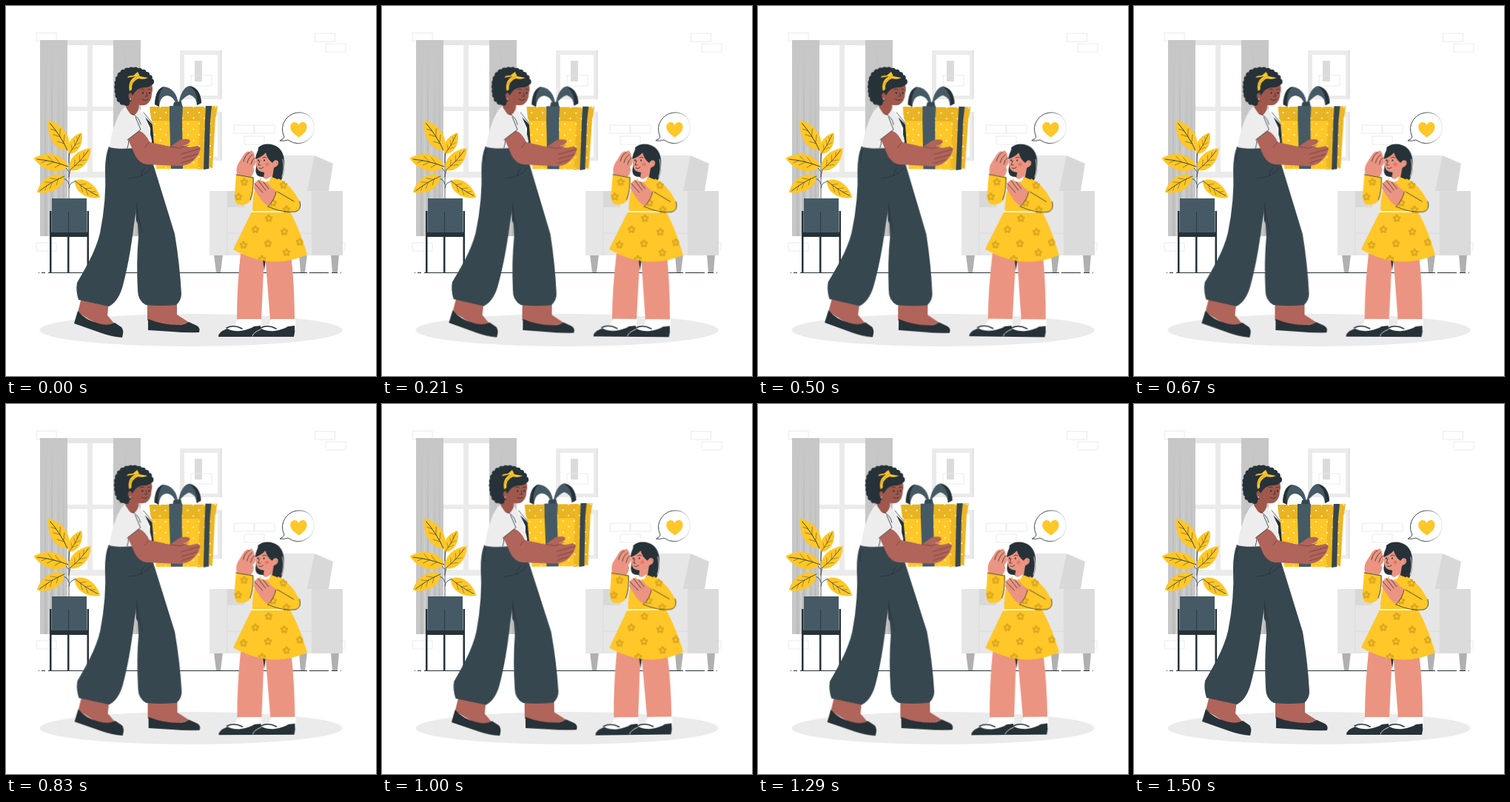
An HTML page that plays this animation: 500x500 px, repeating every 1.54 s.

```html
<!DOCTYPE html>
<html lang="en">
<head>
<meta charset="utf-8">
<title>A present</title>
<style>
html, body { margin: 0; width: 100%; height: 100%; overflow: hidden; background: #fff; }
svg { display: block; width: 100vw; height: 100vh; }
.sway { animation: sway 1540ms linear infinite; }
#woman { transform-origin: 189px 265px; }
#girl { transform-origin: 347px 317px; }
#bubble { transform-origin: 394px 165px; }
/* 1500 ms swing, then a short rest */
@keyframes sway {
  0%, 97.4%, 100% { transform: rotate(0deg); }
  24.35% { transform: rotate(1deg); }
  73.05% { transform: rotate(-1deg); }
}
.line { fill: none; stroke: #263238; stroke-width: .8; stroke-linecap: round; stroke-linejoin: round; }
.ink { fill: #263238; }
.slate { fill: #37474f; }
.steel { fill: #455a64; }
.gold { fill: #ffc727; }
.ochre { fill: #dba81f; }
.face { fill: #a0584c; }
.brown { fill: #b0645a; }
.pink { fill: #eb9481; }
.white { fill: #fff; }
.shirt { fill: #ededed; }
.brick { fill: none; stroke: #e8e8e8; stroke-width: .9; }
</style>
</head>
<body>
<svg viewBox="0 0 500 500">
<defs>
  <g id="leaf">
    <path class="gold" d="M0 0C-14-8-16-30-2-48C13-34 15-10 0 0Z"/>
    <path class="line" stroke-width=".8" d="M0 0Q2-22-2-43"/>
    <path class="line" style="stroke-width:.45" d="M1-10L-6-17M1-12L7-20M1-20L-6-28M1-22L6-30M0-30L-5-36"/>
  </g>
  <g id="flower" class="ochre">
    <circle cy="-3.3" r="2.1"/><circle cx="3.2" cy="-1" r="2.1"/><circle cx="2" cy="2.8" r="2.1"/>
    <circle cx="-2" cy="2.8" r="2.1"/><circle cx="-3.2" cy="-1" r="2.1"/>
    <circle r="1.1" fill="#ffc727"/>
  </g>
  <pattern id="dots" width="15" height="15" patternUnits="userSpaceOnUse" x="198" y="141">
    <circle cx="3" cy="3" r="1" fill="#fff"/><circle cx="10.5" cy="10.5" r="1" fill="#fff"/>
  </pattern>
  <path id="brick" class="brick" d="M0 0H27V11H0Z"/>
  <g id="curtain">
    <path fill="#c7c7c7" d="M0 0H37V265H0Z"/>
    <path fill="#bcbcbc" d="M7 20L9 265H6ZM16 5L18 265H14ZM25 35L27 265H24ZM32 10L33 265H30Z"/>
    <path fill="#d0d0d0" d="M11 15L13 265H11ZM21 30L23 265H20Z"/>
  </g>
  <linearGradient id="fade">
    <stop offset=".45" stop-color="#263238"/><stop offset="1" stop-color="#263238" stop-opacity=".12"/>
  </linearGradient>
  <clipPath id="skirtClip"><path d="M332 278H384Q398 304 407 336Q358 358 307 329Z"/></clipPath>
</defs>

<g id="room">
  <use href="#brick" x="41" y="36.500"/><use href="#brick" x="417.500" y="37"/><use href="#brick" x="432" y="51"/>
  <use href="#brick" x="308" y="161"/><use href="#brick" x="336" y="161"/><use href="#brick" x="322" y="176"/>
  <use href="#brick" x="41" y="320"/><path class="brick" d="M440 320H458V330H440"/>
  <path fill="#ebebeb" d="M82 46H146V232H82Z"/>
  <path class="white" d="M83 53H110V136H83ZM117 53H145V136H117ZM83 142H110V224H83ZM117 142H145V224H117Z"/>
  <path fill="#e6e6e6" d="M82 46H146V53H82Z"/>
  <use href="#curtain" x="46" y="46"/><use href="#curtain" x="145" y="46"/>
  <path fill="#ebebeb" d="M235 60H291V126H235ZM241 66V121H286V66Z" fill-rule="evenodd"/>
  <path fill="#dbdbdb" d="M255 74H265V102H255ZM290 60H291.500V126H290Z"/>
  <path class="brick" d="M250 94H278V108H250Z"/>
  <path fill="#ebebeb" d="M235 143H291V209H235ZM241 149V204H286V149Z" fill-rule="evenodd"/>
  <path fill="#dbdbdb" d="M290 143H291.500V209H290Z"/>
  <ellipse cx="250" cy="438" rx="204.500" ry="22" fill="#ebebeb"/>
  <path class="line" style="stroke-width:1;stroke-linecap:butt" d="M44 360.500H45M48 360.500H53M57 360.500H407M410 360.500H436M440 360.500H448M452 360.500H453"/>

  <path fill="#b0b0b0" d="M281 336H293L290 360H284ZM396 336H407L404 360H398ZM439 336H450L448 360H441Z"/>
  <path fill="#e6e6e6" d="M372 250V206Q372 202 377 202H417L414 250Z"/>
  <path fill="#e6e6e6" d="M275 250H414V337H275Z"/>
  <path fill="#d9d9d9" d="M299 250H322V272H299Z"/>
  <path fill="none" stroke="#d9d9d9" stroke-width=".8" d="M299 250V337M299 307H413"/>
  <path fill="#dbdbdb" d="M413 250H455V337H413Z"/>
  <path fill="#d8d8d8" d="M417 202L442 213L436 250H407Z"/>

  <path class="ink" d="M59 277H61.500V360H59ZM83 306H85.500V360H83ZM109.500 277H112V360H109.500ZM59 305.500H112V312H59Z"/>
  <path class="steel" d="M62 260H109V306H62Z"/>
  <path class="line" d="M84.500 278V306M85 260V188M85 212Q85 201 86 198M85 224Q80 216 72 213M85 231Q86 222 89 219M85 241Q83 232 74 233M85 246Q86 237 96 237"/>
  <use href="#leaf" transform="translate(83 195) rotate(-30)"/>
  <use href="#leaf" transform="translate(85 200) rotate(33) scale(.7)"/>
  <use href="#leaf" transform="translate(84 217) rotate(-74)"/>
  <use href="#leaf" transform="translate(86 222) rotate(46) scale(.86)"/>
  <use href="#leaf" transform="translate(79 230) rotate(-118) scale(.9)"/>
  <use href="#leaf" transform="translate(93 236) rotate(126) scale(.86)"/>
</g>

<g id="woman" class="sway">
  <path class="brown" d="M102 394L139 400L137 418L148 431L128 433L97 414ZM191 401H231V417L248 428L225 433L191 425Z"/>
  <path class="ink" d="M97 412Q108 425 125 429Q138 433 147 428L156 434Q160 438 157 448Q143 447 129 442L92 429ZM192 423Q212 431 232 431Q241 431 247 427L258 432Q263 435 261 441Q245 442 223 440L192 438Z"/>
  <path class="ink" d="M174 235L193 260L187 312L176 290Z"/>
  <path class="slate" d="M177 205L199 214L228 308Q235 350 237 389Q237 398 230 404Q208 406 189 404Q178 398 178 384Q176 345 179 312L175 250Z"/>
  <path class="slate" d="M139 190Q166 194 194 190L198 216Q187 225 181 237Q178 264 173 295Q167 345 157 381Q151 400 139 406L98 397Q94 385 96 374C107 355 121 332 127 307Q136 262 134 222Q134 202 139 190Z"/>
  <path class="line" d="M176 266Q179 288 184 307M196 219Q187 232 166 233M183 229Q182 225 187 220M141 194Q137 205 139 212"/>

  <path class="ink" d="M188 150L199 161L200 186L195 187L195 165Z"/>
  <path class="shirt" d="M161 136Q153 143 149 155Q142 173 140 191Q155 195 194 190Q199 187 196 177L190 156Q185 143 177 136Z"/>
  <path class="face" d="M166 122L180 131L179 140Q174 151 168 146L162 137Z"/>
  <path class="line" d="M186 144L200 161M171 146Q180 150 182 160M166 179Q166 187 164 192"/>

  <g stroke="#263238" fill="#263238">
    <path stroke="none" d="M161 134Q148 130 149 114Q147 96 157 89Q169 82 182 87Q196 92 198 105L193 111L178 112L170 128Z"/>
    <path fill="none" stroke-width="8" stroke-linecap="round" stroke-dasharray="0 5.600" d="M163 131Q151 131 150.500 113Q149 97 158 90Q169 84 181 88Q194 92 196.500 104"/>
  </g>
  <path class="face" d="M170 113Q174 104 183 107Q190 109 197 106Q199 112 197 118Q197 128 190 133Q181 137 171 129L167 126Q163 119 169 117Z"/>
  <path class="ink" d="M167 114Q168 98 183 95Q198 97 199 105Q195 110 187 110Q177 110 171 121Z"/>
  <path class="gold" d="M167 115Q164 101 175 95L164 97Q164 94 172 94L178 89L181 95L192 97Q186 100 179 98Q169 102 170 113Z"/>
  <path fill="none" stroke="#c18d16" stroke-width=".7" d="M175 97L180 94M168 108Q169 101 176 98"/>
  <g class="line">
    <path d="M182 113Q184 111 187 113M192 113Q194 111 196 113M190 117L191 122L188 122M184 126Q188 129 192 126"/>
    <path stroke-width="1.800" d="M185 117V118M194 117V118"/>
    <path stroke="#fff" d="M168 125V127"/>
  </g>

  <g id="gift">
    <path class="gold" d="M197 151H264L259 220H203Z"/>
    <path fill="#edb623" d="M262 151H283L279 219L259 221Z"/>
    <path fill="#e6b021" d="M197 152H262V155H197Z"/>
    <path fill="#e8b422" d="M194 136H265L262 153H196Z"/>
    <path fill="#edb623" d="M264 136L286 135L283 153L262 153Z"/>
    <path fill="url(#dots)" d="M194 136L286 135L282 160L279 219H203L196 154Z"/>
    <path class="steel" d="M221 135H239L238 154L239 220H223L221 154Z"/>
    <path class="slate" d="M270 135H278L276 154L274 220L267 221L269 154Z"/>
    <path class="steel" fill-rule="evenodd" d="M233 134Q231 111 213 109Q202 112 201 133L207 136Q219 121 233 134Z"/>
    <path class="white" d="M207 136Q208 122 218 121Q227 122 230 134Z"/>
    <path class="steel" d="M233 133Q237 110 248 108Q263 111 264 131L258 134Q257 122 248 120Q241 122 233 133Z"/>
    <path class="ink" d="M201 133Q202 112 213 109Q204 119 207 136ZM248 108Q263 111 264 131L258 134Q260 117 248 108Z"/>
    <path class="slate" d="M227 130L237 129L238 135H226Z"/>
  </g>

  <path class="brown" d="M164 178Q169 169 179 168Q189 172 194 184L222 190L235 181Q246 178 249 182Q248 187 239 189L249 191L259 189Q264 191 262 195Q260 203 252 210Q244 217 230 216L190 214Q181 213 175 203Z"/>
  <path class="shirt" d="M159 144Q175 143 182 167L164 181Q154 183 155 164Z"/>
  <path class="line" stroke-width=".6" d="M164 181L182 167L175 150"/>
  <path fill="none" stroke="#7d3d37" stroke-width=".8" stroke-linecap="round" d="M194 184Q190 187 188 191M222 190L235 192L247 188M237 200L262 193M238 206L259 200M237 212L253 207"/>
</g>

<g id="girl" class="sway">
  <path class="pink" d="M317 335H349L345 424H312Q312 380 317 335ZM350 335H385Q390 378 390 424H357Z"/>
  <path class="ink" d="M347 342H351L349 358Z"/>
  <path class="white" d="M313 423H345V438L318 442L298 437L309 432ZM358 423H391V438L364 442L344 437L355 432Z"/>
  <g id="shoe">
    <path class="ink" d="M287 447Q286 441 299 436Q307 440 317 439Q329 437 335 433L344 432Q345 440 343 447Z"/>
    <path class="line" style="stroke-width:1.600" d="M298 435Q308 430 319 436"/>
  </g>
  <use href="#shoe" x="46"/>
  <path class="line" style="stroke:#fff" d="M333 446Q334 441 344 437"/>

  <path class="ink" d="M341 191Q350 184 362 188Q374 192 376 208Q377 226 372 235Q360 239 347 231Q335 231 338 218Z"/>
  <path class="gold" d="M344 233Q351 237 359 231L369 235Q378 245 379 256L383 278H333Q333 260 337 244Z"/>
  <path class="pink" d="M350 219H362L360 231Q354 239 348 233Z"/>
  <path class="white" d="M346 232L352 234L359 230L356 236L350 238L344 236Z"/>

  <path class="gold" d="M332 278H384Q398 304 407 336Q358 358 307 329Z"/>
  <g clip-path="url(#skirtClip)">
    <use href="#flower" x="355" y="287"/><use href="#flower" x="337" y="302"/><use href="#flower" x="376" y="305"/>
    <use href="#flower" x="321" y="323"/><use href="#flower" x="354" y="321"/><use href="#flower" x="379" y="333"/>
    <use href="#flower" x="397" y="319"/><use href="#flower" x="346" y="342"/>
  </g>
  <path fill="none" stroke="#fff" stroke-width="1.600" d="M332 278H384"/>

  <path class="pink" d="M338 203Q337 218 341 222Q349 228 359 222L363 218Q369 216 368 210Q366 206 361 210L356 199L342 197Z"/>
  <path class="ink" d="M337 207Q339 189 354 187Q370 188 374 207L370 219Q370 207 363 208L360 212Q353 207 351 198Q346 204 337 207Z"/>
  <g class="line">
    <path d="M339 205L342 204M347 205Q349 203 352 205M343 209L341 215H344M342 219Q345 221 348 218"/>
    <path stroke-width="1.700" d="M341 208V209M349 208V209"/>
    <path stroke="#c66d5d" d="M365 211L367 212"/>
    <path style="stroke:#fff" d="M374 207Q377 219 373 231"/>
  </g>
  <circle cx="353" cy="214" r="2.500" fill="#e57767"/>

  <path class="gold" d="M311 228L335 231Q335 248 331 262Q325 271 313 268Q308 264 309 253Z"/>
  <path class="pink" d="M312 228Q310 218 315 211L322 200Q326 195 329 197L332 195L335 199L336 204L338 210Q337 215 334 217Q337 224 331 231Z"/>
  <path class="line" stroke-width=".7" d="M321 210Q323 201 329 198M326 212Q328 204 333 201M331 214Q332 208 336 205M311 228L334 232Q335 250 330 262"/>
  <use href="#flower" x="322" y="238"/><use href="#flower" x="314" y="258"/>

  <path class="gold" d="M368 233Q379 238 389 251L398 266Q399 275 392 278Q374 280 350 271L358 249L374 257L364 247Z"/>
  <use href="#flower" x="375" y="242"/><use href="#flower" x="379" y="275"/><use href="#flower" x="361" y="266"/>
  <path class="pink" d="M336 239L341 235L348 237Q354 238 358 245L365 250Q363 262 354 270Q347 266 343 259L335 247Z"/>
  <path class="line" stroke-width=".7" d="M336 240L347 252M341 236L351 249M348 238L355 247M365 251Q363 262 354 271M367 251L389 264M354 271Q374 280 391 278Q400 276 397 264"/>
</g>

<g id="bubble" class="sway">
  <path d="M376 177Q370 164 378 153Q386 143 399 144Q413 146 416 160Q418 175 407 182Q394 190 381 181Q376 183 370 182Q375 180 376 177Z" fill="#fff" stroke="url(#fade)" stroke-width=".9"/>
  <path class="gold" d="M395.500 177.500Q386 171 384.500 166Q383 159 389 157Q394 156.500 395.500 161Q398 156 403 157Q408 160 406 167Q404 172 395.500 177.500Z"/>
</g>
</svg>
</body>
</html>
```
